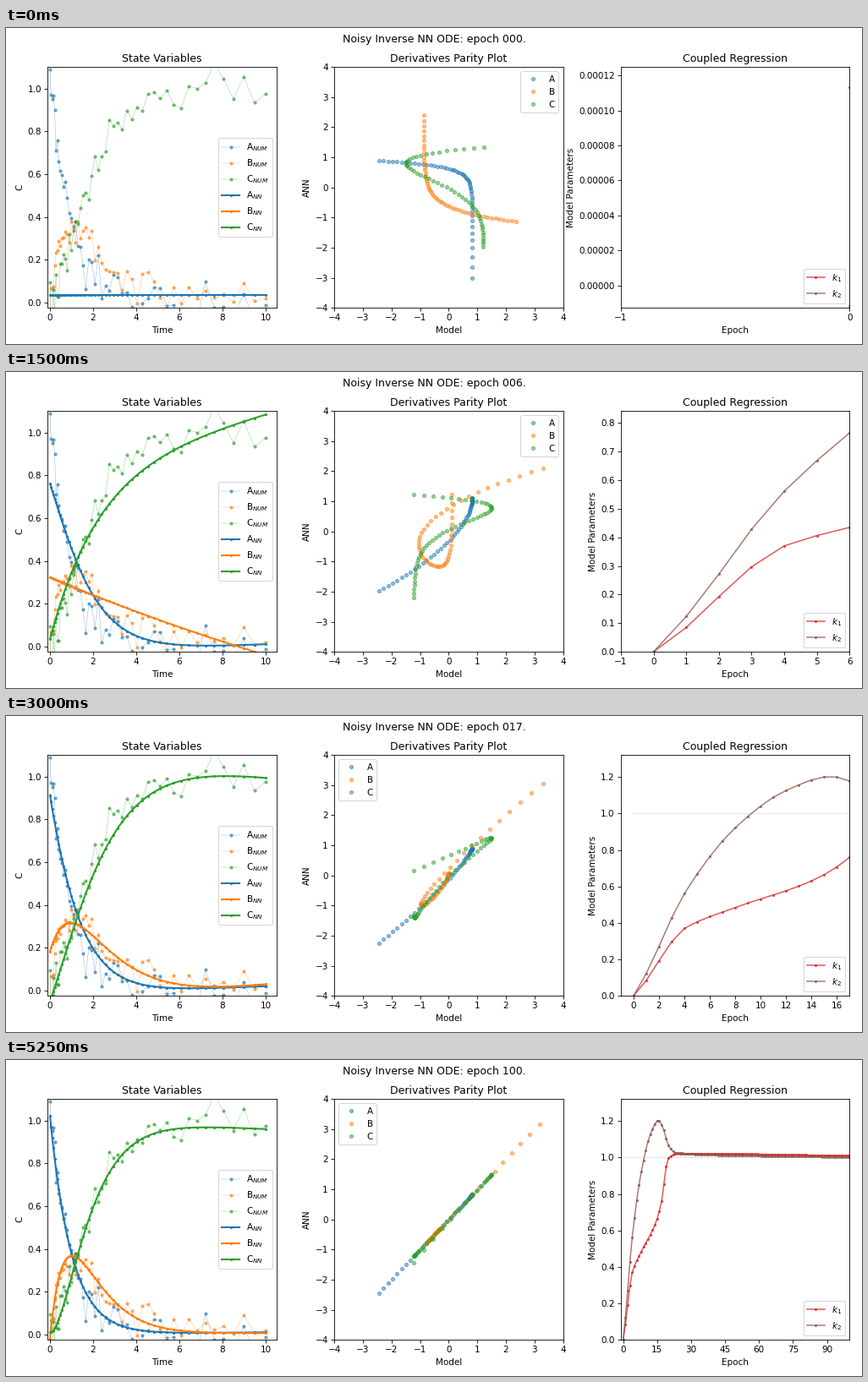
These frames come from a looping animation (1012x374 px, 5.5 s). A matplotlib script:

```python
import numpy as np
import matplotlib.pyplot as plt
from matplotlib.animation import FuncAnimation
from matplotlib.ticker import MaxNLocator

W, H, DPI = 1012, 374, 75
# One epoch per step at first, then about a fifth more each time
EPOCHS = [*range(9), 10, 12, 14, 17, 20, 24, 29, 35, 43, 53, 65, 81, 100]
KEYS = [0, 4, 8, 17, 22]
COLORS = ['tab:blue', 'tab:orange', 'tab:green']
NAMES = 'ABC'

# Sampling times, denser near zero
t = np.logspace(0, np.log10(11), 50) - 1
A, B = np.exp(-t), t * np.exp(-t)
noisy = [A, B, 1 - A - B] + .05 * np.random.RandomState(0).randn(3, 50)


def decay(s, p, q, r, c=0):
    return c + s * t + (p + q * t) * np.exp(-r * t)


def standard(d):
    return (d - d.mean(1, keepdims=True)) / d.std(1, keepdims=True)


def rates(a, b):
    """Standardised derivatives of A -> B -> C."""
    return standard(np.array([-a * A, a * A - b * B, b * B]))


def smooth(points, x):
    """Monotone cubic through a few points."""
    px, py = np.array(points).T
    s = np.diff(py) / np.diff(px)
    inner = [2 * a * b / (a + b) if a * b > 0 else 0 for a, b in zip(s, s[1:])]
    m = np.r_[s[0], inner, s[-1]]
    i = np.clip(np.searchsorted(px, x, 'right') - 1, 0, len(s) - 1)
    h = px[i + 1] - px[i]
    f = (x - px[i]) / h
    return (py[i] + (py[i + 1] - py[i]) * f * f * (3 - 2 * f)
            + h * f * (1 - f) * ((1 - f) * m[i] - f * m[i + 1]))


def blend(keys, epoch):
    if epoch < 4:
        epoch = 4 * (1 - (1 - epoch / 4) ** 2)
    w = [np.interp(epoch, KEYS, row) for row in np.eye(len(KEYS))]
    return np.tensordot(w, keys, 1)


# Fitted rate constants by epoch
steps = np.arange(101)
k1 = smooth([(0, 1.135e-4), (1, .085), (3, .297), (4, .37), (8, .484),
             (14, .63), (17, .76), (19, .95), (20, .997), (24, 1.022),
             (100, 1.01)], steps)
k2 = smooth([(0, -1.17e-5), (1, .1235), (4, .561), (8, .9215), (12, 1.126),
             (15.5, 1.203), (18, 1.149), (20, 1.065), (23, 1.027),
             (40, 1.014), (100, 1.002)], steps)

# Coefficients of decay() for A, B and C at each key epoch
states = np.array([[decay(*row) for row in key] for key in [
    [(0, 0, 0, 1, .035), (0, 0, 0, 1, -.1), (0, 0, 0, 1, -.1)],
    [(.004, .767, .4, .9, -.03), (-.035, .311, 0, 0),
     (.042, -.626, 0, .458, .714)],
    [(.004, .812, .42, .92, -.03), (-.014, .336, .02, .17),
     (.012, -.95, 0, .44, .931)],
    [(.004, .933, .3, 1, -.02), (.0105, .262, .53, .72, -.08),
     (-.012, -1.17, -.5, .68, 1.12)],
    [(.001, 1.02, 0, 1), (.0006, -.02, 1.02, 1), (-.005, -1, -1, 1, 1.01)],
]])

slopes = np.array([standard(np.array([decay(*row) for row in key])) for key in [
    [(0, -1, 0, -.15), (1, 0, 0, 0), (0, 1, 0, .12)],
    [(0, -1, 0, .55), (.5, 6.35, 0, .42), (-1, 0, 0, 0)],
    [(0, -1, 0, .58), (.55, 6, 0, .58), (0, 1, 0, .1)],
    [(-.02, -3.25, 0, .77), (0, 1, -1.42, .8), (.06, 1.95, 4.1, .75)],
    [(0, -1, 0, 1), (0, 1, -1, 1), (0, 0, 1, 1)],
]])
slopes[-1, 2] -= .22 * np.exp(-np.arange(50) / 3)

fig, (ax1, ax2, ax3) = plt.subplots(1, 3, figsize=(W / DPI, H / DPI), dpi=DPI)
fig.subplots_adjust(left=49.45 / W, right=997.3 / W, bottom=42.8 / H,
                    top=327.8 / H, wspace=.253)
title = fig.suptitle('')
ax1.set(title='State Variables', xlabel='Time', ylabel='C',
        xlim=(-.1, 10.5), ylim=(-.025, 1.1))
ax2.set(title='Derivatives Parity Plot', xlabel='Model', ylabel='ANN',
        xlim=(-4, 4), ylim=(-4, 4))
ax3.set(title='Coupled Regression', xlabel='Epoch', ylabel='Model Parameters')
ax3.xaxis.set_major_locator(MaxNLocator(integer=True))


def lines(ax, style, labels, colors, **kw):
    return [ax.plot([], [], style, color=c, label=n, **kw)[0]
            for n, c in zip(labels, colors)]


samples = lines(ax1, '.-', [n + '$_{NUM}$' for n in NAMES], COLORS,
                lw=.4, ms=6, alpha=.6)
for line, y in zip(samples, noisy):
    line.set_data(t, y)
fits = lines(ax1, '.-', [n + '$_{NN}$' for n in NAMES], COLORS, lw=2, ms=4)
dots = lines(ax2, 'o', NAMES, COLORS, ms=4, alpha=.5)
goal, = ax3.plot([], [], color='#e6e6e6', lw=1)
params = lines(ax3, '.-', ['$k_1$', '$k_2$'], ['tab:red', 'tab:brown'],
               lw=1.5, ms=4, alpha=.75)
for ax, loc in (ax1, 'center right'), (ax2, 'best'), (ax3, 'lower right'):
    ax.legend(loc=loc)


def update(n):
    e = EPOCHS[n]
    title.set_text(f'Noisy Inverse NN ODE: epoch {e:03d}.')
    for line, y in zip(fits, blend(states, e)):
        line.set_data(t, y)
    for line, x, y in zip(dots, rates(k1[e], k2[e]), blend(slopes, e)):
        line.set_data(x, y)
    ks = np.array([k1, k2])[:, :e + 1]
    for line, k in zip(params, ks):
        line.set_data(steps[:e + 1], k)
    goal.set_data([0, e], [1, 1])
    ax3.set(xlim=(-1, e), ylim=(1.1 * ks.min(), 1.1 * ks.max()))
    return [title, goal, *fits, *dots, *params]


anim = FuncAnimation(fig, update, frames=len(EPOCHS), interval=250,
                     repeat=True, repeat_delay=0)
plt.show()
```
